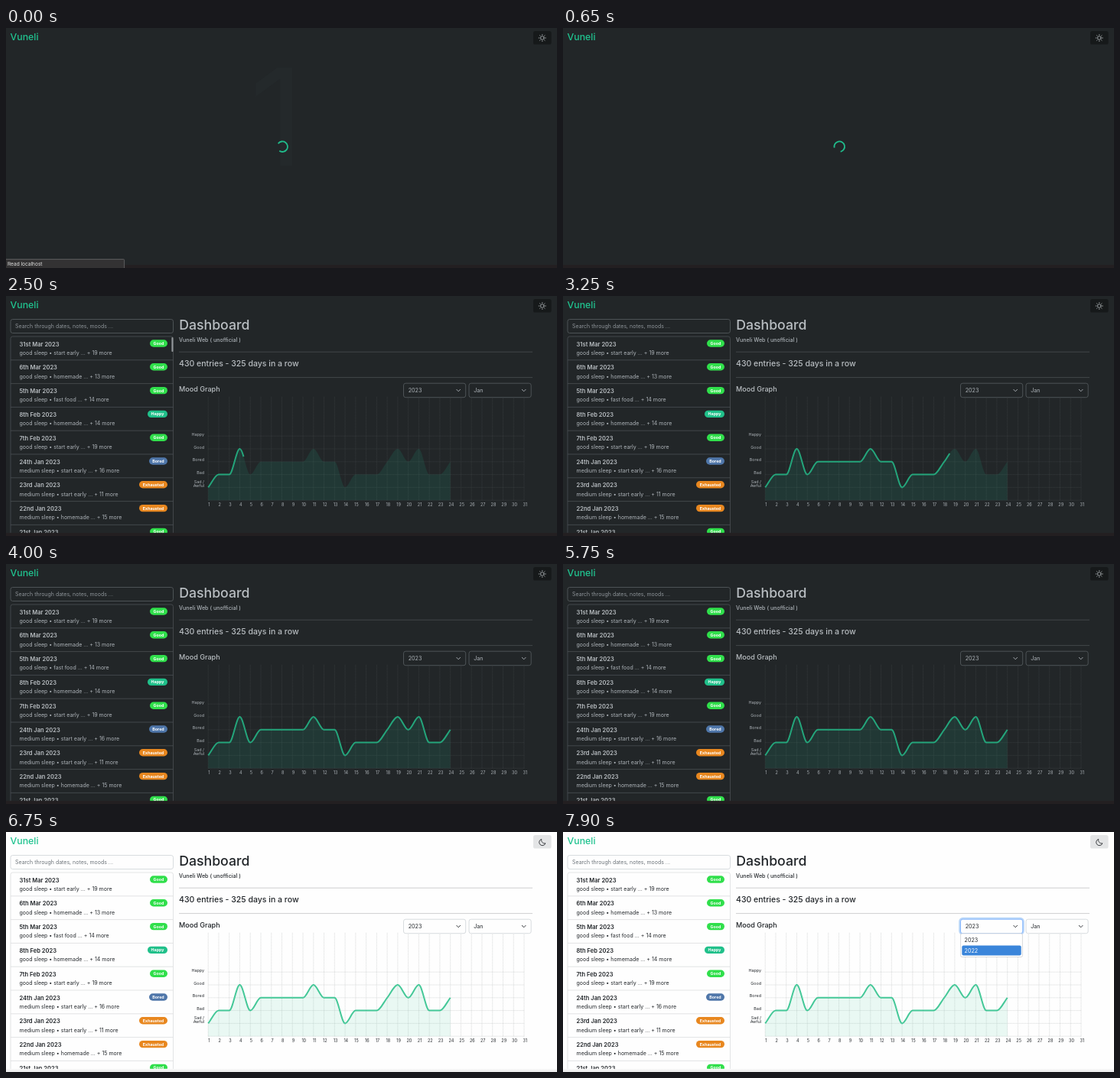
These frames come from a looping animation (720 px wide and 314 px high, 8 s). An HTML page:

```html
<!DOCTYPE html>
<html lang="en">
<head>
<meta charset="utf-8">
<title>Mood dashboard</title>
<style>
  html, body { margin: 0; width: 100%; height: 100%; overflow: hidden; }
  svg {
    display: block; width: 100%; height: 100%;
    font-family: Inter, "Open Sans", sans-serif;
    --bg: #222628; --text: #adb3b8; --strong: #b9bec2; --muted: #8e9499;
    --rule: #4a4f52; --grid: #43484b; --line: #24a57b; --area: #20c997;
    --frame: #4b5053; --foot0: #231f21; --foot1: #231f21;
  }
  svg.light {
    --bg: #fefefe; --text: #25292d; --strong: #212529; --muted: #6c7379;
    --rule: #c4c5c6; --grid: #bdbfc0; --line: #45c898; --area: #45c898;
    --frame: #dcdedf; --foot0: #fafafa; --foot1: #e9e9e9;
  }
  text { fill: var(--text); white-space: pre; }
  .brand { fill: #20c38f; }
  .strong { fill: var(--strong); }
  .muted { fill: var(--muted); }
  .rule { stroke: var(--rule); stroke-width: .8; }
  .frame { fill: none; stroke: var(--frame); stroke-width: .8; }
  .grid { stroke: var(--grid); stroke-width: .6; stroke-dasharray: 1 1; }
  .field { fill: var(--bg); stroke-width: 1; }
  .chevron { fill: none; stroke: var(--text); stroke-width: .9; stroke-linecap: round; stroke-linejoin: round; }
  .line { fill: none; stroke: var(--line); stroke-width: 2; }
  .area { fill: var(--area); fill-opacity: .11; }
  .white { fill: #fff; }
</style>
</head>
<body>
<svg id="stage" viewBox="0 0 720 314" preserveAspectRatio="none">
  <defs>
    <linearGradient id="footFill" x2="0" y2="1">
      <stop offset="0" stop-color="var(--foot0)"/>
      <stop offset="1" stop-color="var(--foot1)"/>
    </linearGradient>
  </defs>
  <rect width="720" height="314" fill="var(--bg)"/>
</svg>
<script>
const LOOP = 8000;
const READY = 1650;        // data has loaded
const LIGHT = 5800;        // theme switch
const FOCUS = 7450;        // year select is clicked
const stage = document.getElementById('stage');

function add(parent, tag, attrs = {}, content = '') {
  const el = document.createElementNS('http://www.w3.org/2000/svg', tag);
  for (const key in attrs) el.setAttribute(key, attrs[key]);
  el.textContent = content;
  return parent.appendChild(el);
}
const label = (parent, x, y, size, content, attrs = {}) =>
  add(parent, 'text', { x, y, 'font-size': size, ...attrs }, content);
const box = (parent, x, y, width, height, rx, attrs) =>
  add(parent, 'rect', { x, y, width, height, rx, ...attrs });
const rule = (parent, x1, y1, x2, y2, cls) =>
  add(parent, 'line', { x1, y1, x2, y2, class: cls });

const ghost = label(stage, 318, 180, 176, '1', { style: 'fill:#24292b' });
const page = add(stage, 'g');

// Entry list
const moods = {
  Good: ['#30df4b', 23], Happy: ['#20c08a', 26], Bored: ['#4f76a9', 24], Exhausted: ['#e8871f', 37],
};
const entries = [
  ['31st Mar 2023', 'good sleep • start early ... + 19 more', 'Good'],
  ['6th Mar 2023', 'good sleep • homemade ... + 13 more', 'Good'],
  ['5th Mar 2023', 'good sleep • fast food ... + 14 more', 'Good'],
  ['8th Feb 2023', 'good sleep • homemade ... + 14 more', 'Happy'],
  ['7th Feb 2023', 'good sleep • start early ... + 19 more', 'Good'],
  ['24th Jan 2023', 'medium sleep • start early ... + 16 more', 'Bored'],
  ['23rd Jan 2023', 'medium sleep • start early ... + 11 more', 'Exhausted'],
  ['22nd Jan 2023', 'medium sleep • homemade ... + 15 more', 'Exhausted'],
  ['21st Jan 2023', '', 'Good'],
];
const fields = [box(page, 6, 30.5, 212.5, 18, 2.7, { class: 'field' })];
label(page, 12, 42.2, 7, 'Search through dates, notes, moods ...', { class: 'muted' });
box(page, 6, 53, 212.5, 270, 2.7, { class: 'frame' });
entries.forEach(([date, note, mood], i) => {
  const y = 53 + i * 30.8;
  const [color, width] = moods[mood];
  if (i) rule(page, 6, y, 218.5, y, 'frame');
  label(page, 17.5, y + 12.6, 7.55, date, { 'font-weight': 600, class: 'strong' });
  label(page, 17.5, y + 23.7, 7.02, note);
  box(page, 211 - width, y + 4.3, width, 9.4, 4.7, { fill: color });
  label(page, 211 - width / 2, y + 10.9, 5.3, mood,
    { 'font-weight': 700, 'text-anchor': 'middle', class: 'white' });
});
const scrollbar = box(page, 216.4, 54, 2, 19, 1, { fill: '#94989b' });

// Headings
label(page, 226.2, 44.3, 17.7, 'Dashboard', { class: 'strong', 'font-weight': 500 });
label(page, 226, 59.7, 7.1, 'Vuneli Web ( unofficial )', { 'font-weight': 500 });
rule(page, 226, 73.2, 688, 73.2, 'rule');
label(page, 226, 92, 10.53, '430 entries - 325 days in a row', { class: 'strong', 'font-weight': 500 });
rule(page, 226, 106.6, 688, 106.6, 'rule');
label(page, 226, 124.7, 9.05, 'Mood Graph', { class: 'strong', 'font-weight': 500 });

// Chart
const LAST_DAY = 31;
const dayX = day => 264.2 + (day - 1) * 13.76;
const levelY = level => 267.2 - level * 16.8;
for (let day = 1; day <= LAST_DAY; day++) {
  rule(page, dayX(day), 132, dayX(day), levelY(0), 'grid');
  label(page, dayX(day) + 1.2, 274.6, 5.5, day, { 'text-anchor': 'middle' });
}
for (let level = 0; level <= 5; level++) {
  rule(page, dayX(1), levelY(level), dayX(LAST_DAY), levelY(level), 'grid');
}
[['Happy', 183], ['Good', 199.9], ['Bored', 216.4], ['Bad', 233], ['Sad /', 244.6], ['Awful', 250]]
  .forEach(([name, y]) => label(page, 259, y, 5.4, name, { 'text-anchor': 'end' }));

// Monotone cubic curve through one level per day
function smoothPath(levels) {
  const pts = levels.map((level, i) => [dayX(i + 1), levelY(level)]);
  const dx = pts[1][0] - pts[0][0];
  const slopes = pts.slice(1).map((p, i) => (p[1] - pts[i][1]) / dx);
  const tangents = pts.map((_, i) => {
    const before = slopes[i - 1] ?? slopes[i], after = slopes[i] ?? slopes[i - 1];
    return before * after > 0 ? 2 * before * after / (before + after) : 0;
  });
  return pts.slice(1).reduce((d, [x, y], i) => {
    const [px, py] = pts[i];
    return d + `C${px + dx / 3} ${py + tangents[i] * dx / 3} ${x - dx / 3} ${y - tangents[i + 1] * dx / 3} ${x} ${y}`;
  }, `M${pts[0]}`);
}
const curve = smoothPath([...'122423333343312223434223'].map(Number));
add(page, 'path', { d: `${curve}V${levelY(0)}H${dayX(1)}Z`, class: 'area' });
const line = add(page, 'path', { d: curve, class: 'line', pathLength: 1, 'stroke-dasharray': '1 2' });

// Selects
const ring = box(page, 518.4, 113, 83.2, 20.6, 4, { fill: 'none', stroke: '#b9d6f8', 'stroke-width': 2.4 });
[[519.5, '2023'], [605, 'Jan']].forEach(([x, value]) => {
  fields.push(box(page, x, 114.2, 81.2, 18.5, 2.7, { class: 'field' }));
  label(page, x + 6.2, 125.9, 7.2, value);
  add(page, 'path', { d: `M${x + 69.3} 122.3l2.4 2.5l2.4 -2.5`, class: 'chevron' });
});
const menu = add(page, 'g');
box(menu, 519.6, 132.8, 80.8, 30.8, 2, { fill: '#fff', stroke: '#cfd1d3', 'stroke-width': .8 });
const highlight = box(menu, 521.3, 0, 77.4, 13, 2, { fill: '#3a85da' });
const options = ['2023', '2022'].map((year, i) => label(menu, 524.5, 143.7 + i * 14, 7.2, year));

// Header, footer strip, spinner and status
label(stage, 5.6, 15.5, 12.3, 'Vuneli', { class: 'brand', 'font-weight': 500 });
const toggle = box(stage, 689, 4, 23.6, 17.6, 2.7);
const sun = add(stage, 'g', { transform: 'translate(700.8 13)', fill: 'none', stroke: '#aeb3b6', 'stroke-width': .85, 'stroke-linecap': 'round' });
add(sun, 'circle', { r: 2.3 });
for (let a = 0; a < 360; a += 45) add(sun, 'path', { d: 'M3.8 0H4.6', transform: `rotate(${a})` });
const moon = add(stage, 'path', {
  d: 'M699.8 9.4A4.2 4.2 0 1 0 704.9 14.8A4.3 4.3 0 0 1 699.8 9.4Z',
  fill: 'none', 'stroke-width': .9, 'stroke-linejoin': 'round',
});
box(stage, 0, 309.8, 720, 4.2, 0, { fill: 'url(#footFill)' });
const spinner = add(stage, 'path', {
  d: 'M-4.81 -4.81A6.8 6.8 0 1 1 -4.81 4.81', fill: 'none', stroke: '#20bd8c', 'stroke-width': 1.8,
});
const status = add(stage, 'g');
box(status, -1, 302.6, 155.6, 13, 1, { fill: '#333233', stroke: '#69696a', 'stroke-width': .8 });
label(status, 2, 310.8, 6.55, 'Read localhost', { style: 'fill:#e2e2e2' });

const progress = (t, from, to) => Math.min(1, Math.max(0, (t - from) / (to - from)));
const ease = p => (1 - Math.cos(Math.PI * p)) / 2;
const mix = (a, b, p) => `rgb(${a.map((v, i) => Math.round(v + (b[i] - v) * p))})`;
const show = (el, visible) => { el.style.display = visible ? '' : 'none'; };

function render(t) {
  const light = t >= LIGHT;
  const settle = ease(progress(t, LIGHT, 6400));
  stage.classList.toggle('light', light);

  show(ghost, t < 50);
  show(status, t < 400);
  show(spinner, t < READY);
  show(page, t >= READY);
  spinner.setAttribute('transform', `translate(361.2 155.2) rotate(${t * 360 / 750 - 10})`);

  scrollbar.style.opacity = 1 - progress(t, 2650, 2850);
  const drawn = ease(progress(t, 1980, 3900));
  line.setAttribute('stroke-dashoffset', 1 - drawn);
  show(line, drawn > 0);

  show(sun, !light);
  show(moon, light);
  toggle.style.fill = light ? mix([34, 36, 38], [228, 229, 230], settle) : '#16191a';
  moon.style.stroke = mix([160, 164, 167], [40, 43, 46], settle);
  const border = light ? mix([84, 88, 92], [216, 220, 223], settle) : '#4d5356';
  fields.forEach(field => { field.style.stroke = border; });

  const focus = progress(t, FOCUS, FOCUS + 150);
  ring.style.opacity = focus;
  if (focus) fields[1].style.stroke = mix([216, 220, 223], [134, 183, 254], focus);
  show(menu, t >= FOCUS + 50);
  const hovered = t < 7700 ? 0 : 1;
  highlight.setAttribute('y', 134.6 + hovered * 14);
  options.forEach((option, i) => option.classList.toggle('white', i === hovered));
}

const start = performance.now();
function tick() {
  render((performance.now() - start) % LOOP);
  requestAnimationFrame(tick);
}
tick();
</script>
</body>
</html>
```
